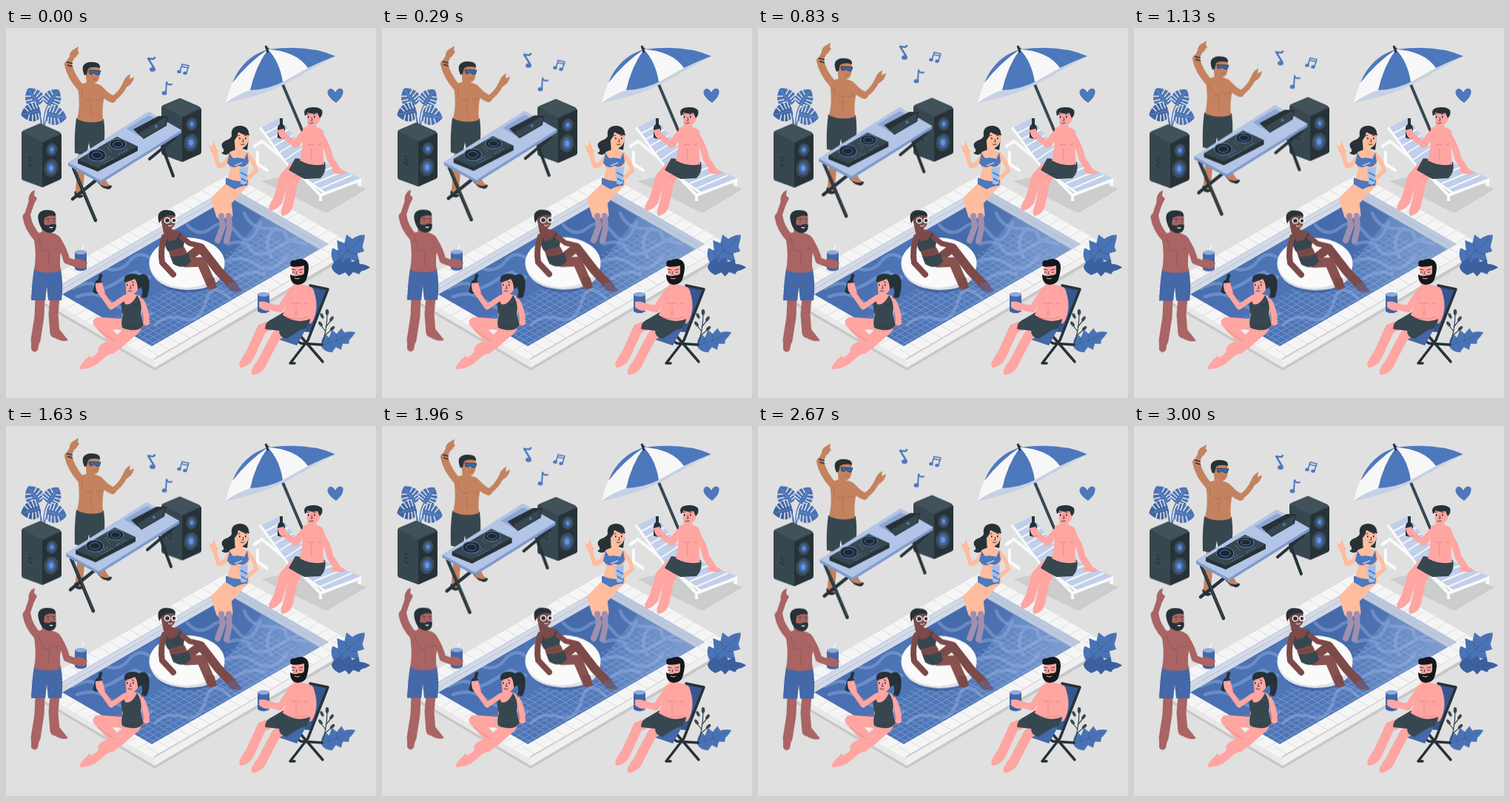
An HTML page that plays this animation: 500x500 px, repeating every 3.04 s.

```html
<!DOCTYPE html>
<html lang="en">
<head>
<meta charset="utf-8">
<title>Pool party</title>
<style>
html,body{margin:0;width:100%;height:100%;overflow:hidden;background:#e0e0e0}
svg{display:block;width:100vw;height:100vh}
.l{fill:none;stroke:currentColor;stroke-linecap:round;stroke-linejoin:round}
.f{fill:currentColor}
.d{fill:#263238}.g{fill:#37474f}.b{fill:#4d78bc}.w{fill:#f5f5f5}
.t{fill:none;stroke:#263238;stroke-width:.9;stroke-linecap:round}
.s{fill:none;stroke:#0002;stroke-width:1;stroke-linecap:round}
.pink{color:#ffa5a2}
.move{animation:1520ms cubic-bezier(.37,0,.63,1) infinite alternate}
.quick{animation-duration:760ms}
.mid{animation-delay:-380ms}
#dj{animation-name:rise}
#table{animation-name:lift}
#notes{animation-name:hop}
#boxL{animation-name:bobL}
#boxR{animation-name:bobR}
#stand,#float{animation-name:sway}
@keyframes rise{to{transform:translateY(-9px)}}
@keyframes lift{to{transform:translate(-3px,-10px)}}
@keyframes hop{to{transform:translateY(-16.5px)}}
@keyframes bobL{from{transform:translateY(1.4px)}to{transform:translateY(-1px)}}
@keyframes bobR{from{transform:translateY(-1.4px)}to{transform:translateY(1.2px)}}
@keyframes sway{from{transform:translateY(.5px)}to{transform:translateY(-.5px)}}
</style>
</head>
<body>
<svg viewBox="0 0 500 500">
<defs>
  <g id="leaf">
    <path class="f" d="M0 0C-17 2-20-14-12-24Q-7-31 0-34Q7-31 12-24C20-14 17 2 0 0Z"/>
    <path d="M-17-5L-4-4M-18-11L-4-9M-16-18L-4-14M-12-25L-3-20M17-5L4-4M18-11L4-9M16-18L4-14M12-25L3-20" stroke="#e0e0e0" stroke-width="2"/>
    <path d="M0 0V-30" stroke="#7f9dd2" stroke-width=".8"/>
  </g>
  <g id="frond">
    <path class="f" d="M0 0Q-12-2-16-9L-9-11L-19-17L-10-20L-16-27L-7-28Q-6-35 0-39Q5-35 8-30L14-28L10-22L19-18L11-14L17-8Q10 0 0 0Z"/>
    <path d="M0 0V-34M0-8L-9-11M0-8L10-11M0-17L-9-20M0-17L10-21" fill="none" stroke="#36578f" stroke-width=".5"/>
  </g>
  <g id="face">
    <path class="t" d="M-6-5L-3-6M3-6L6-5M1-1L2 3H0M-2 6Q0 8 3 6"/>
    <path class="d" d="M-4-3h1.5v2.6h-1.5zM4-3h1.5v2.6h-1.5z"/>
  </g>
  <g id="speaker">
    <path class="g" d="M21 142Q21 139 24 138L43 130Q46 128 49 130L72 140Q75 142 75 145V200Q75 203 72 205L52 214Q49 216 46 214L24 206Q21 205 21 202Z"/>
    <path d="M23 140L46 130L73 142L49 154Z" fill="#41525b"/>
    <path class="d" d="M49 155L75 143V201Q75 204 72 205L49 215Z"/>
    <path d="M28 170L37 174V190L28 186ZM29 175L36 178M29 180L36 183" fill="#2f3d45" stroke="#4b5d67" stroke-width=".7"/>
    <g fill="#3d4d57"><ellipse cx="62" cy="164" rx="7.5" ry="9" transform="rotate(12 62 164)"/><ellipse cx="61" cy="189" rx="9.5" ry="12" transform="rotate(12 61 189)"/></g>
    <g fill="#3e68ad"><ellipse cx="62" cy="164" rx="4.5" ry="5.5"/><ellipse cx="61" cy="189" rx="6" ry="8"/></g>
    <g fill="#6f93d0"><ellipse cx="62" cy="164" rx="2" ry="2.5"/><ellipse cx="61" cy="189" rx="3" ry="4"/></g>
  </g>
  <g id="can">
    <path d="M1-13L4-21" stroke="#f5f5f5" stroke-width="1.6"/>
    <path d="M-8-11Q0-16 8-11V12Q0 17-8 12Z" fill="#4468a8"/>
    <ellipse cy="-11" rx="8" ry="3" fill="#8fabdc"/>
    <path d="M-8 9Q0 14 8 9" fill="none" stroke="#34558f"/>
  </g>
  <path id="bottle" class="d" d="M-2-14H2V-6Q5-4 5 0V12Q0 15-5 12V0Q-5-4-2-6Z"/>
  <pattern id="tiles" width="8" height="8" patternUnits="userSpaceOnUse"><path d="M0 .5H8M.5 0V8" stroke="#9bb5e0" stroke-width=".9"/></pattern>
  <linearGradient id="water"><stop stop-color="#476db0"/><stop offset=".6" stop-color="#5279b9"/><stop offset="1" stop-color="#86a3d3"/></linearGradient>
  <clipPath id="basin"><path d="M303 215L436 292L197 430L64 353Z"/></clipPath>
</defs>
<rect width="500" height="500" fill="#e0e0e0"/>

<!-- potted leaves and speakers -->
<g color="#4a73b5">
  <path class="l" d="M49 132Q46 115 41 102M51 132Q50 112 59 101M48 132Q46 117 40 115M52 132Q54 121 58 118" stroke-width="1.3"/>
  <use href="#leaf" transform="translate(44 104) rotate(-32) scale(.78)"/>
  <use href="#leaf" transform="translate(57 104) rotate(34) scale(.74)"/>
  <use href="#leaf" transform="translate(46 111) rotate(-105) scale(.78)" color="#3f65a5"/>
  <use href="#leaf" transform="translate(55 116) rotate(102) scale(.8)"/>
</g>
<g id="boxL" class="move quick mid"><use href="#speaker"/></g>
<g id="boxR" class="move quick mid"><use href="#speaker" x="189" y="-34"/></g>

<!-- disc jockey -->
<g id="dj" class="move" color="#c4825f">
  <path class="l" d="M103 158Q102 190 99 218M123 158L126 200L133 212" stroke-width="10"/>
  <path class="d" d="M93 220Q99 223 105 227Q102 231 96 229Q91 226 93 220ZM123 207Q132 211 143 213Q143 218 137 218Q126 214 123 207Z"/>
  <path class="f" d="M94 218L100 215L105 224Q99 228 95 223ZM125 206L134 207L141 213Q134 216 126 211Z"/>
  <path class="g" d="M95 122L132 123Q135 145 131 168L115 170L112 155L109 172L93 169Q92 143 95 122Z"/>
  <path class="f" d="M97 79Q106 71 122 75Q134 78 134 90Q129 105 131 125Q113 131 96 123Q101 106 97 79Z"/>
  <path class="l" d="M102 82Q87 65 84 49" stroke-width="10"/>
  <path class="l" d="M84 49L91 36" stroke-width="7"/>
  <path class="f" d="M86 38Q86 31 93 28L98 25L97 31L99 33L94 40ZM158 76Q159 67 168 62L167 69L173 66Q172 75 163 80Z"/>
  <path class="l" d="M129 85Q137 94 144 96" stroke-width="10"/>
  <path class="l" d="M144 96Q155 89 161 76" stroke-width="7"/>
  <path d="M82 46L90 48M83 50L90 52" stroke="#263238" stroke-width="1.5"/>
  <path class="f" d="M107 50H126Q129 72 120 74L119 80H109Z"/>
  <path class="d" d="M106 64Q99 48 113 46Q128 45 127 54Q117 51 111 55L109 63Z"/>
  <path d="M112 57L128 58L126 63Q121 64 119 60Q117 64 113 62Z" fill="#3568b8" stroke="#263238" stroke-width=".8"/>
  <path class="s" d="M107 96Q113 101 118 96M122 97Q127 99 130 94M115 102V118M102 84L104 94M117 69Q121 70 123 68"/>
</g>

<!-- table and gear -->
<g id="table" class="move">
  <g color="#263238" class="l" stroke-width="4"><path d="M211 160L226 200M229 148L194 177"/><path d="M91 189L121 260M125 203L90 231" stroke-width="4.5"/></g>
  <path d="M92 190L121 259" stroke="#455a64"/>
  <path d="M84 182L193 113L237 138V142L128 210L84 186Z" fill="#7d99cc"/>
  <path d="M84 182L193 113L237 138L128 206Z" fill="#b3c5e6"/>
  <path class="d" d="M97 178L150 147L178 160V166L124 194L97 183Z"/>
  <path class="g" d="M97 178L150 147L178 160L124 189Z"/>
  <g fill="#1d282e" stroke="#5f82bd"><ellipse cx="123" cy="172" rx="12" ry="8"/><ellipse cx="151" cy="157" rx="11" ry="7"/></g>
  <g fill="none" stroke="#4d78bc"><ellipse cx="123" cy="172" rx="7" ry="4.5"/><ellipse cx="151" cy="157" rx="6.5" ry="4"/></g>
  <path d="M128 181L142 173M132 183L147 175M152 171L164 164M137 161L143 168" stroke="#6f8fc8" stroke-dasharray="2 2"/>
  <path d="M163 136L193 118L212 127L180 146Z" fill="#8da6d3"/>
  <path class="d" d="M172 137L206 119L219 119L217 132L186 150Z"/>
  <path class="g" d="M180 142L213 122Q217 120 217 123L215 132L185 149Z"/>
  <circle class="b" cx="203" cy="133" r="2"/>
</g>

<g id="notes" class="move quick" color="#4d78bc">
  <path class="l" d="M200 54L192 41Q200 43 201 40" stroke-width="2.4"/><ellipse class="f" cx="198" cy="56" rx="4" ry="3"/>
  <path class="l" d="M235 59L238 49L247 51L244 60M237 52L246 54" stroke-width="1.6"/><ellipse class="f" cx="234" cy="59" rx="2.8" ry="2.2"/><ellipse class="f" cx="242" cy="61" rx="2.8" ry="2.2"/>
  <path class="l" d="M216 87L217 73Q219 78 224 76" stroke-width="2"/><ellipse class="f" cx="214" cy="88" rx="3.5" ry="2.8"/>
</g>

<!-- pool -->
<path d="M33 350V364L201 463L468 306V292Z" fill="#c8c8c8"/>
<path d="M33 350L201 448V459L33 360Z" fill="#e9e9e9"/>
<path d="M201 448L468 292V301L201 459Z" fill="#f0f0f0"/>
<g transform="matrix(.866 .5 -.866 .5 303 197)">
  <path class="w" d="M0 0H190V312H0Z"/>
  <rect x="9" y="9" width="172" height="294" fill="none" stroke="#dcdcdc" stroke-width="18" stroke-dasharray="1 15"/>
</g>
<g clip-path="url(#basin)">
  <path d="M60 210H440V435H60Z" fill="url(#water)"/>
  <path d="M303 230L225 275L290 325L345 255Z" fill="#36579a" opacity=".4"/>
  <path transform="matrix(.866 .5 -.866 .5 303 197)" d="M105 50H172V294H105Z" fill="url(#tiles)" opacity=".6"/>
  <g fill="none" stroke="#9ab5e2" stroke-width="4.5" opacity=".42" stroke-linecap="round">
    <path d="M90 352Q115 340 121 349T151 343T176 330T194 337M96 363Q119 355 135 366T168 385T196 386M130 323Q153 333 166 316T196 312M202 401Q217 386 239 393T270 370T302 365"/>
    <path d="M245 266Q260 284 278 270T313 278T344 263M300 292Q322 284 331 299T372 294T413 287M296 316Q320 306 339 320T379 309M322 250Q329 270 354 271T378 280T405 291M310 339Q333 325 350 333M365 270Q345 287 359 310"/>
  </g>
  <path d="M303 215L64 353V367L303 229Z" fill="#d3dae6"/>
  <path d="M303 215L436 292V306L303 229Z" fill="#bcc8dd"/>
  <path d="M303 222L64 360M303 222L436 299" stroke="#a9b8d2" stroke-width=".7"/>
</g>

<!-- parasol, lounger, heart -->
<path d="M345 207L433 250L487 218L425 189Z" fill="#cdcdcd"/>
<path d="M353 27L401 140" stroke="#37474f" stroke-width="4"/>
<path d="M297 101Q309 45 354 29Q408 22 445 38L389 69Q352 91 297 101Z" fill="#c7d1e3"/>
<path d="M297 101Q309 45 354 29Q408 22 445 38L408 54L374 73L330 84Q312 90 297 101Z" fill="#f7f7f7"/>
<path class="b" d="M354 29Q320 39 306 74Q328 46 354 29ZM354 29Q337 52 330 84Q354 83 374 73Q370 46 354 29ZM354 29Q392 31 408 54Q427 45 445 38Q408 22 354 29Z"/>
<path d="M354 33L351 24" stroke="#263238" stroke-width="3"/>
<path class="b" d="M446 101C436 94 432 88 436 83Q441 80 445 87Q449 79 455 83Q458 91 446 101Z"/>
<path d="M334 161L346 153L385 185L425 226L480 205M340 166V184L354 193M425 225V234M478 207V214" fill="none" stroke="#fafafa" stroke-width="4" stroke-linejoin="round"/>
<path d="M346 134L371 121L411 177L384 190Z" fill="#c0cfea"/>
<path d="M384 190L411 174L479 203L431 223Z" fill="#c0cfea"/>
<path d="M351 142L376 129M357 150L382 137M363 159L388 145M370 168L394 153M377 178L401 162M397 195L430 182M407 202L442 188M416 210L455 194M425 217L467 199" stroke="#f7f7f7" stroke-width="2"/>
<path d="M343 134L384 190L431 223L480 205" fill="none" stroke="#fafafa" stroke-width="3"/>

<g class="pink">
  <path class="l" d="M424 144Q435 160 438 177L448 192" stroke-width="9"/>
  <path class="f" d="M442 188L452 190L460 195Q455 200 440 195Z"/>
  <path class="l" d="M399 192L388 207L382 237M389 187L376 202L367 234" stroke-width="13"/>
  <path class="f" d="M361 230L373 233Q369 246 357 247Q352 245 361 230ZM376 235L388 237Q387 251 374 254Q368 252 376 235Z"/>
  <path class="g" d="M391 176L431 181Q434 194 425 203L403 204L382 192Z"/>
  <path class="f" d="M401 136Q412 128 427 137Q431 142 430 150Q427 164 430 184Q414 188 397 179Q402 160 401 136Z"/>
  <path class="l" d="M404 142L391 157" stroke-width="10"/>
  <path class="l" d="M390 157L374 144" stroke-width="8"/>
  <use href="#bottle" x="372" y="136"/>
  <path class="f" d="M367 138L375 136L380 145L374 150Q368 147 367 138Z"/>
  <path class="f" d="M406 112H424Q427 126 419 131V138H408Z"/>
  <path class="d" d="M404 119Q401 110 408 108Q421 105 427 111Q429 117 424 122L421 115Q411 117 408 114Z"/>
  <use href="#face" x="412" y="122"/>
  <path class="s" d="M406 156Q412 160 418 156M413 162V176M422 158L427 156M388 201Q398 196 404 198"/>
</g>

<!-- woman on the far edge -->
<g color="#ffbd9f">
  <path class="d" d="M305 146Q303 132 317 132Q330 133 328 148L326 165Q314 161 304 168Q298 174 291 169Q297 166 292 161Q290 155 297 152Q303 150 305 146Z"/>
  <path class="l" d="M316 215L298 235L300 252M304 212L284 232L290 252" stroke-width="13"/>
  <path class="l" d="M301 254L302 270L298 288M291 254L293 268L286 287" stroke-width="8" style="stroke:#a08fae"/>
  <path class="f" d="M302 168Q312 161 326 168Q332 173 327 187Q324 193 329 211Q317 228 298 216Q296 210 303 192Q300 180 302 168Z"/>
  <path class="l" d="M304 171Q295 188 287 186L282 169" stroke-width="6"/>
  <path class="f" d="M277 168L274 158L278 160L281 152L284 162L287 166L284 173Z"/>
  <path class="l" d="M326 171Q336 181 338 193L323 206" stroke-width="6"/>
  <path class="b" d="M302 169L307 176Q315 174 322 177L326 168L328 181Q322 191 314 186Q305 192 299 182ZM297 202Q313 210 327 205L326 213Q318 213 309 218Q302 214 297 211Z"/>
  <path d="M309 186L319 182" stroke="#fff"/>
  <path d="M315 190L327 188L325 210Q321 213 317 210Z" fill="#a3bfe9"/><path d="M317 195L326 200M318 203L324 207" stroke="#4d78bc" stroke-width="2"/>
  <path class="f" d="M308 141H328Q330 157 320 162V169H310Z"/>
  <path class="d" d="M306 151Q304 136 317 134Q327 134 329 145Q319 145 314 140Q313 148 308 152Z"/>
  <use href="#face" x="319" y="151"/>
</g>

<!-- woman on the ring -->
<g id="float" class="move quick mid" color="#7c4a48">
  <path d="M195 328Q210 361 255 357Q286 353 294 332Z" fill="#34558f" opacity=".6"/>
  <ellipse cx="244.5" cy="318" rx="51" ry="35" fill="#fafafa"/>
  <path d="M194 322Q203 348 241 351Q280 350 295 323Q294 353 245 354Q199 352 194 322Z" fill="#dde1e8"/>
  <path class="l" d="M242 313L263 297L287 328L308 350" stroke-width="12"/>
  <path class="f" style="fill:#6d5a78" d="M300 345L310 343L319 356Q311 359 301 351Z"/>
  <path class="l" d="M243 317L264 316L277 346" stroke-width="13" style="stroke:#875250"/>
  <path class="f" d="M271 337L281 337L285 350Q279 356 272 351Z"/>
  <path class="f" d="M213 275Q224 269 236 276Q243 284 240 295Q247 304 246 319Q236 326 225 316Q218 300 213 275Z"/>
  <path class="g" d="M214 278L220 288Q231 289 235 276Q243 285 239 296L219 302Q212 292 214 278ZM222 308Q234 310 246 304L250 315Q241 328 226 319Z"/>
  <path class="l" d="M214 282Q208 300 211 317L226 333" stroke-width="8"/>
  <path class="l" d="M238 283L248 291L261 294" stroke-width="7"/>
  <path class="f" d="M208 252H228Q231 267 224 270L225 277H213Z"/>
  <path class="d" d="M207 264Q202 248 214 246Q229 245 229 254Q218 251 211 257Z"/>
  <g class="d" stroke="#fff" stroke-width="1.5"><circle cx="218" cy="260" r="3.6"/><circle cx="227" cy="260" r="3"/></g>
  <path d="M219 267Q223 269 225 266" stroke="#fff" fill="none"/>
  <path class="s" d="M225 305L238 301"/>
</g>

<!-- standing man -->
<g id="stand" class="move quick mid" color="#a96463">
  <path class="l" d="M46 365L45 390L40 422M66 364L64 387L66 412" stroke-width="13"/>
  <path class="f" d="M34 418L46 419L43 435Q38 441 34 434ZM59 406L72 407L84 422Q74 426 61 415Z"/>
  <path d="M38 325L74 325Q78 348 75 368H57L55 349L53 368H34Q35 343 38 325Z" fill="#4468a8"/>
  <path class="f" d="M37 281Q49 272 66 278Q77 282 76 295Q71 311 74 328Q56 334 38 327Q42 305 37 281Z"/>
  <path class="l" d="M43 284Q30 270 28 255" stroke-width="11"/>
  <path class="l" d="M28 255L35 234" stroke-width="8"/>
  <path class="f" d="M31 236Q29 227 35 221L39 219L38 226L42 230L38 238Z"/>
  <path class="l" d="M71 288Q79 301 82 314L95 319" stroke-width="9"/>
  <use href="#can" x="101" y="314"/>
  <path class="f" d="M92 313Q99 310 110 317L108 324Q99 327 92 322Z"/>
  <path class="f" d="M47 251H67Q70 274 60 277V282H49Z"/>
  <path class="d" d="M46 267Q38 247 54 246Q68 245 67 254Q57 252 52 257L51 265Q57 268 61 265Q65 264 68 266Q68 277 59 277Q50 276 46 267Z"/>
  <path d="M58 269Q61 272 64 269Z" fill="#fff"/>
  <path class="t" d="M55 258H59M63 258H66M57 261V262M65 261V262"/>
  <path class="s" d="M49 299Q56 304 62 299M66 299L71 297M58 304V321M53 368L55 350M44 284L47 293"/>
</g>

<!-- woman on the near edge -->
<g class="pink">
  <path class="d" d="M176 337Q187 328 192 337Q196 347 191 363Q188 367 183 363Q187 351 179 348Z"/>
  <path class="l" d="M183 370Q190 382 190 398" stroke-width="8"/>
  <path class="l" d="M174 405L151 425L133 435" stroke-width="17"/>
  <path class="l" d="M161 401L125 398L151 426" stroke-width="15"/>
  <path class="l" d="M148 426L118 451" stroke-width="11"/>
  <path class="f" d="M113 443L124 452Q116 461 100 461Q98 456 113 443ZM144 419L155 426Q152 440 139 441Q135 436 144 419Z"/>
  <path class="f" d="M157 362Q169 356 181 362Q187 371 183 388L187 402Q176 415 155 405L157 388Z"/>
  <path class="g" d="M157 364L161 373Q170 376 177 361Q185 371 182 386L186 402Q177 413 157 405Q155 397 158 388Q154 376 157 364Z"/>
  <path class="l" d="M158 366L142 377L130 360" stroke-width="7"/>
  <use href="#bottle" transform="translate(125 346) rotate(14)"/>
  <path class="f" d="M121 345L130 344L134 358L126 361Q120 354 121 345Z"/>
  <path class="f" d="M161 337H181Q181 355 173 359V366H163Z"/>
  <path class="d" d="M160 343Q158 333 170 332Q184 332 185 345Q182 352 178 353Q178 344 174 339Q166 343 160 343Z"/>
  <use href="#face" x="167" y="349"/>
  <path class="s" d="M150 412Q160 405 174 403M124 407L147 424M171 374Q176 376 180 374"/>
</g>

<!-- right foliage -->
<g color="#4a73b5">
  <use href="#frond" transform="translate(444 319) rotate(46) scale(1.1 1.46)"/>
  <use href="#frond" transform="translate(440 322) rotate(92) scale(.68 1.34)" color="#3d61a0"/>
  <use href="#frond" transform="translate(426 430) rotate(68) scale(.78 1.28)"/>
  <path class="l" d="M427 428Q434 409 434 383M432 404L441 393M432 410L424 400M430 416L441 407" stroke-width="1.2" style="stroke:#37474f"/>
  <g class="g"><ellipse cx="434" cy="384" rx="2.3" ry="4"/><ellipse cx="440" cy="393" rx="2" ry="4" transform="rotate(35 440 393)"/><ellipse cx="425" cy="400" rx="2" ry="4" transform="rotate(-35 425 400)"/><ellipse cx="441" cy="406" rx="2" ry="4" transform="rotate(45 441 406)"/><ellipse cx="427" cy="389" rx="2" ry="4" transform="rotate(-25 427 389)"/></g>
</g>

<!-- man in folding chair -->
<path d="M411 348L434 354L411 411L372 408L385 389Z" fill="#36578f"/>
<path class="l" color="#263238" d="M411 348L435 353L408 422L384 453M367 400L398 426L427 428M390 407L428 451M384 453H390" stroke-width="3.5"/>
<path d="M365 407L405 407L393 429L363 419Z" fill="#4468a8"/>
<g class="pink">
  <path class="l" d="M412 358Q419 379 410 395L389 402" stroke-width="9"/>
  <path class="l" d="M384 406L365 416L346 452M372 397L346 406L329 443" stroke-width="13"/>
  <path class="f" d="M324 438L336 443Q331 457 317 459Q311 456 324 438ZM341 448L353 452Q349 466 334 469Q327 465 341 448Z"/>
  <path class="g" d="M377 383L411 391Q412 405 396 409L379 420Q369 418 369 409L350 407Q350 397 360 393Z"/>
  <path class="f" d="M383 351Q397 343 414 351Q420 360 415 374L411 393Q394 401 374 388Q380 371 383 351Z"/>
  <path class="l" d="M386 356L370 380L355 376" stroke-width="9"/>
  <use href="#can" x="348" y="371"/>
  <path class="f" d="M342 370Q350 368 358 373L356 382Q347 383 342 377Z"/>
  <path class="f" d="M386 317H407Q408 339 399 344V351H388Z"/>
  <path fill="#12181b" d="M385 322Q382 313 390 314Q401 309 407 316Q411 321 407 336Q405 347 394 347Q384 346 384 333Q390 337 396 334Q401 335 403 331L403 321Q392 324 385 322Z"/>
  <path class="t" d="M386 326L391 327M396 327L401 326M387 330H390M397 330H400M393 329L392 333"/>
  <path d="M390 338Q394 340 397 338" fill="none" stroke="#ffb8b2"/>
  <path class="s" d="M385 371Q391 375 397 371M402 373L408 372M392 377V389M362 409L372 403M374 389Q391 396 408 391"/>
</g>
</svg>
</body>
</html>
```
